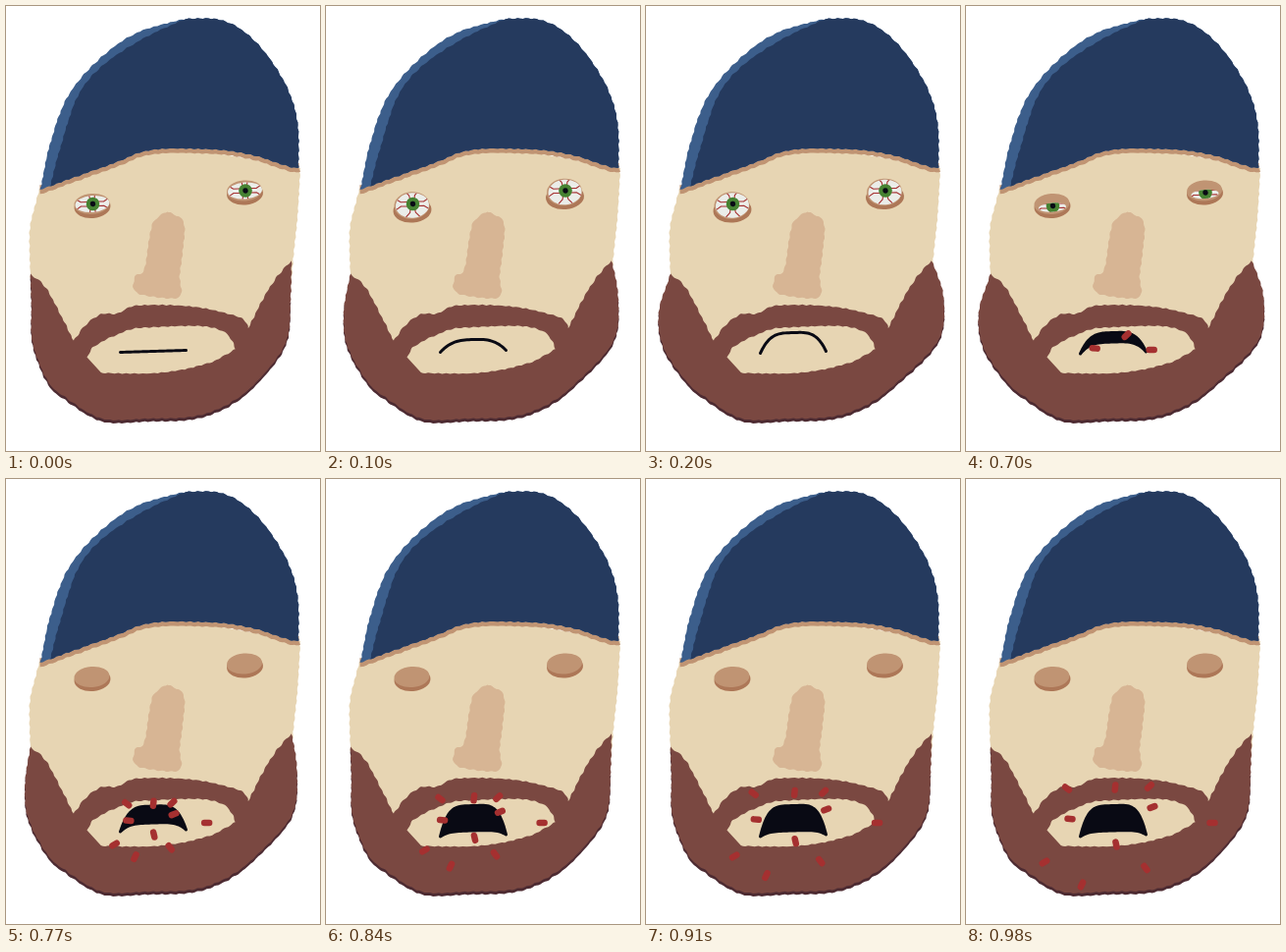
These frames come from a looping animation (320 by 453 pixels, 1.05 s). An HTML page with a canvas:

```html
<!DOCTYPE html>
<html lang="en">
<head>
<meta charset="utf-8">
<title>Sneezing face</title>
<style>
html, body { margin: 0; width: 100%; height: 100%; overflow: hidden; background: #fff; }
canvas { display: block; }
</style>
</head>
<body>
<canvas id="stage" width="320" height="453"></canvas>
<script>
const ctx = document.getElementById('stage').getContext('2d');
const LOOP = 1050, SNEEZE = 700, LAST = 980;
const C = {
  hat: '#253a5e', hatLight: '#3c5e8b', skin: '#e7d5b3', nose: '#d7b594',
  lid: '#c09473', lidDark: '#ad7757', beard: '#7a4841', rim: '#4d2b32',
  red: '#a53030', black: '#090a14', white: '#ebede9', green: '#468232'
};

const mix = (a, b, k) => a + (b - a) * k;
const mixPoints = (a, b, k) => a.map((v, i) => mix(v, b[i], k));

// Samples a Catmull-Rom spline through x,y pairs, with a slight hand-drawn wobble.
function curve(p) {
  const count = p.length / 2, out = [];
  const at = (i, axis) => p[2 * Math.min(Math.max(i, 0), count - 1) + axis];
  const spline = (i, axis, t) => {
    const [a, b, c, d] = [-1, 0, 1, 2].map(n => at(i + n, axis));
    return b + t / 2 * (c - a + t * (2 * a - 5 * b + 4 * c - d + t * (3 * (b - c) + d - a)));
  };
  for (let i = 0; i < count - 1; i++) {
    for (let t = 0; t <= 1; t += 1 / 16) {
      const x = spline(i, 0, t), y = spline(i, 1, t);
      out.push(x + .5 * Math.sin(y * .7), y + .5 * Math.sin(x * .7));
    }
  }
  return out;
}
function trace(p) {
  ctx.beginPath();
  for (let i = 0; i < p.length; i += 2) ctx.lineTo(p[i], p[i + 1]);
}
function shape(color, ...parts) {
  trace(parts.flat());
  ctx.closePath();
  ctx.fillStyle = color;
  ctx.fill();
}
function line(color, width, p) {
  trace(p);
  ctx.strokeStyle = color;
  ctx.lineWidth = width;
  ctx.stroke();
}
function ovalPath(x, y, rx, ry) {
  ctx.beginPath();
  ctx.ellipse(x, y, rx, ry, -.08, 0, Math.PI * 2);
}
function oval(color, ...box) {
  ovalPath(...box);
  ctx.fillStyle = color;
  ctx.fill();
}

const brim = curve([35,187, 72,173.5, 110,160, 148,146.5, 210,146, 250,151.5, 290,164, 298,164]);
const crown = curve([298,164, 297,118, 284,78, 255,37, 222,15, 183,13]);
const hatBack = curve([183,13, 134,27, 95,54, 63,92, 45,140, 35,187]);
const hatFold = curve([183,13, 140,33, 98,61, 73,92, 56,142, 45,183]);
const leftFace = curve([34,187, 25,222, 24,250, 26,300]);
const rightFace = curve([290,290, 293,255, 297,215, 300,165]);
const nose = curve([164,209, 181,220, 180,250, 177,275, 177,296, 150,296, 131,290, 132,275,
  141,268, 146,236, 151,219, 164,209]);
const cheekLeft = curve([25,273, 40,286, 56,315, 69,341]);
const moustache = curve([69,341, 80,326, 96,314, 114,313, 133,305, 190,306, 238,317, 247,328]);
const cheekRight = curve([247,328, 262,298, 276,276, 291,259]);
const lipTop = curve([83,357, 92,345, 125,330, 150,327, 200,326, 224,333, 234,349]);
const lipBottom = curve([234,349, 205,364, 155,373.5, 97,373.5]);

// Where the droplets end up, relative to the centre of the mouth.
const MOUTH = { x: 148, y: 350 };
const spray = [-42,-4, 103,0, 39,-37, -45,-35, 4,-36, 42,-16, -68,40, -30,63, 5,22, 35,46];

// puff: beard volume, eye: opening, base/top/bottom: mouth corners and lip arches
const poses = [
  { at: 0, puff: 0, eye: 'tired', base: 351.5, top: 0, bottom: 0 },
  { at: 100, puff: .6, eye: 'wide', base: 351.5, top: 12, bottom: 12 },
  { at: 200, puff: 1, eye: 'wide', base: 352.5, top: 20, bottom: 20 },
  { at: 700, puff: 1, eye: 'slit', base: 353, top: 20.5, bottom: 11 },
  { at: 770, puff: .5, eye: 'closed', base: 358, top: 25, bottom: 8 },
  { at: 840, puff: 0, eye: 'closed', base: 363, top: 30.5, bottom: 5 }
];

function drawEyeball(rx, ry, y, look) {
  ctx.save();
  ovalPath(0, y, rx, ry);
  ctx.clip();
  ctx.fillStyle = C.white;
  ctx.fillRect(-22, -22, 44, 44);
  for (let i = 0; i < 8; i++) {
    const a = i * Math.PI / 4 + .35, b = a + (i % 2 ? .15 : -.15);
    line(C.red, 1.1, [Math.cos(a) * 6, look + Math.sin(a) * 6,
      Math.cos(b) * 12, look + Math.sin(b) * 9, Math.cos(a) * 18, look + Math.sin(a) * 14]);
  }
  oval(C.green, .5, look, 6.8, 6.8);
  oval(C.black, .5, look, 2.7, 2.7);
  ctx.restore();
}

function drawEye(x, y, state) {
  ctx.save();
  ctx.translate(x, y);
  const wide = state === 'wide';
  oval(C.lidDark, 0, wide ? 5 : 1.5, wide ? 19.5 : 18.5, wide ? 12.5 : 11.5);
  oval(C.lid, -.5, wide ? 0 : -1.5, 18, wide ? 13.8 : 10.5);
  if (wide) drawEyeball(17, 12.8, 0, -1.5);
  if (state === 'tired') drawEyeball(17.5, 8.5, -1.5, -1.5);
  if (state === 'slit') drawEyeball(14, 4.5, 2, .5);
  ctx.restore();
}

function drawBeard(puff) {
  const right = mixPoints([291,259, 290,298, 285,343, 255,383], [291,259, 303,295, 298,340, 255,384], puff);
  const left = mixPoints([42,381, 27,342, 26,305, 25,273], [42,383, 18,348, 13,312, 25,273], puff);
  const outer = curve([...right, 225,406, 190,418, 145,420, 98,420, 60,398, ...left]);
  ctx.save();
  ctx.translate(0, 3);
  shape(C.rim, outer.slice(32), [69,341, 247,328]);
  ctx.restore();
  shape(C.beard, outer, cheekLeft, moustache, cheekRight);
  shape(C.skin, lipTop, lipBottom);
}

function drawMouth({ base, top, bottom }) {
  const power = 2 + top / 12, upper = [], lower = [];
  for (let s = -1; s <= 1; s += 1 / 16) {
    const x = 150 + 33.5 * s, arch = 1 - Math.abs(s) ** power;
    upper.push(x, base - top * arch - s);
    lower.unshift(x, base - bottom * arch - s);
  }
  const outline = [...upper, ...lower];
  shape(C.black, outline);
  line(C.black, 3, outline);
}

function drawSpray(u) {
  const spread = .4 + .6 * u, count = u > 0 ? spray.length : 6;
  for (let i = 0; i < count; i += 2) {
    const dx = spray[i], dy = spray[i + 1], tail = 2.5 / Math.hypot(dx, dy);
    const point = k => [MOUTH.x + dx * k, MOUTH.y + dy * k];
    line(C.red, 6.5, [...point(spread - tail), ...point(spread + tail)]);
  }
}

function draw(time) {
  const pose = poses.findLast(p => p.at <= time);
  ctx.fillStyle = '#fff';
  ctx.fillRect(0, 0, 320, 453);
  ctx.lineJoin = 'round';

  shape(C.skin, leftFace, [80,380, 250,360], rightFace, [160,140]);
  ctx.lineCap = 'butt';
  line(C.lid, 9, brim);
  ctx.lineCap = 'round';
  shape(C.hatLight, brim, crown, hatBack);
  shape(C.hat, brim.slice(10), crown, hatFold);
  shape(C.nose, nose);
  drawEye(88, 203, pose.eye);
  drawEye(243.5, 189.5, pose.eye);
  drawBeard(pose.puff);
  drawMouth(pose);
  if (time >= SNEEZE) {
    const step = Math.floor((time - SNEEZE) / 70);
    drawSpray(step * 70 / (LAST - SNEEZE));
  }
}

const start = performance.now();
function tick() {
  draw(Math.max(0, performance.now() - start) % LOOP);
  requestAnimationFrame(tick);
}
tick();
</script>
</body>
</html>
```
